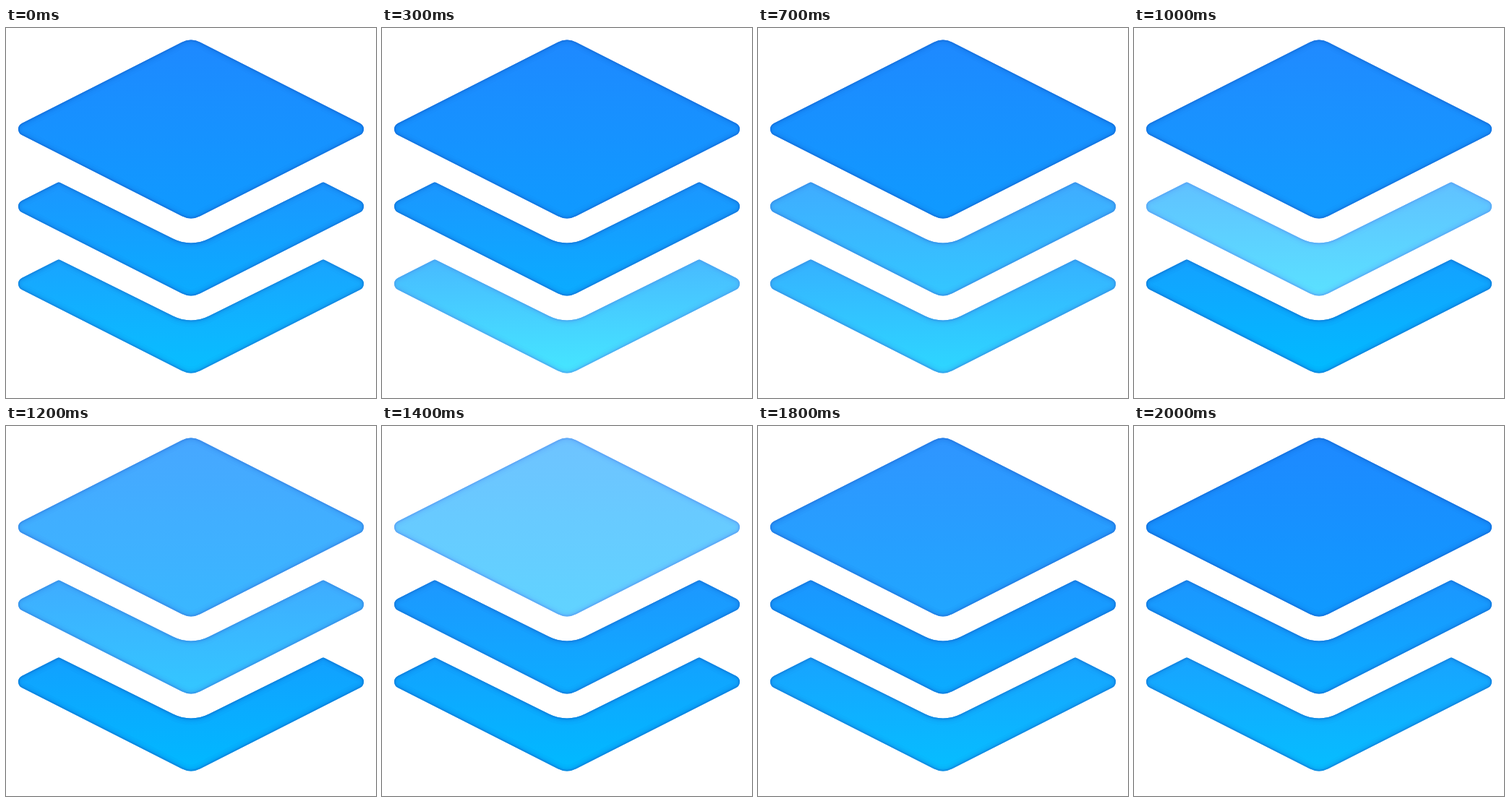
Animation of 512x512 px, one loop 2.1 s. Source, as an HTML page with a canvas:

```html
<!DOCTYPE html>
<html lang="en">
<head>
<meta charset="utf-8">
<title>Layers</title>
<style>
html, body { margin: 0; width: 100%; height: 100%; overflow: hidden; background: #fff; }
canvas { display: block; width: 512px; height: 512px; }
</style>
</head>
<body>
<canvas id="stage" width="512" height="512"></canvas>
<script>
const ctx = document.getElementById('stage').getContext('2d');
const LOOP = 2100, STEP = 100, COUNT = 3;
const CX = 256, HALF_W = 250, HALF_H = 126.7;

// Corners are [x, y, radius]
function rounded(points) {
  const path = new Path2D();
  const n = points.length;
  const last = points[n - 1], first = points[0];
  path.moveTo((last[0] + first[0]) / 2, (last[1] + first[1]) / 2);
  points.forEach(([x, y, r], i) => {
    const next = points[(i + 1) % n];
    path.arcTo(x, y, next[0], next[1], r);
  });
  path.closePath();
  return path;
}

// A diamond; lower layers have a notch cut out of the top
function shape(i, y) {
  const top = i === 0
    ? [[CX, y - HALF_H, 28]]
    : [[CX - 183, y - 34, 4], [CX, y + 57, 56], [CX + 183, y - 34, 4]];
  return rounded([
    ...top, [CX + HALF_W, y, 9], [CX, y + HALF_H, 28], [CX - HALF_W, y, 9]
  ]);
}

// Colours of the gradient ends and the rim; glow runs from 0 to 1
function colors(i, glow) {
  const mix = (a, b) => a + (b - a) * glow;
  const rgb = (r, g, b) => `rgb(${Math.round(r)},${Math.round(g)},${Math.round(b)})`;
  return {
    from: rgb(mix(30 - 3 * i, 112 - 14 * i), mix(137 + 13 * i, 196 - 2 * i), 255),
    to: rgb(mix(15 - 5 * i, 98 - 6 * i), mix(154 + 18 * i, 212 + 14 * i), 255),
    rim: rgb(mix(20, 90), mix(106 + 8 * i, 156 + 5 * i), mix(214, 242))
  };
}

function bump(t, center, half) {
  const d = Math.abs(t - center);
  return d < half ? (1 + Math.cos(Math.PI * d / half)) / 2 : 0;
}

const layers = Array.from({ length: COUNT }, (_, i) => {
  const y = 140 + 107 * i;
  return {
    i, path: shape(i, y),
    top: y - (i ? 34 : 123), bottom: y + 123,
    peak: 1450 - 500 * i
  };
});

function drawLayer({ i, path, top, bottom, peak }, t) {
  // The lowest layer dims a little after its glow
  const dim = i === COUNT - 1 ? 0.1 * bump(t, peak + 800, 600) : 0;
  const { from, to, rim } = colors(i, bump(t, peak, 500) - dim);
  const fill = ctx.createLinearGradient(0, top, 0, bottom);
  fill.addColorStop(0, from);
  fill.addColorStop(1, to);

  ctx.save();
  ctx.fillStyle = fill;
  ctx.fill(path);
  ctx.clip(path);
  ctx.strokeStyle = rim;
  // Nested strokes form the soft bevel
  for (let width = 18; width > 2; width *= 0.68) {
    ctx.lineWidth = width;
    ctx.globalAlpha = Math.min(0.6, 1 / width);
    ctx.stroke(path);
  }
  ctx.restore();
}

function frame(now) {
  const t = Math.floor(now % LOOP / STEP) * STEP;
  ctx.fillStyle = '#fff';
  ctx.fillRect(0, 0, 512, 512);
  layers.forEach(layer => drawLayer(layer, t));
  requestAnimationFrame(frame);
}

frame(0);
</script>
</body>
</html>
```
